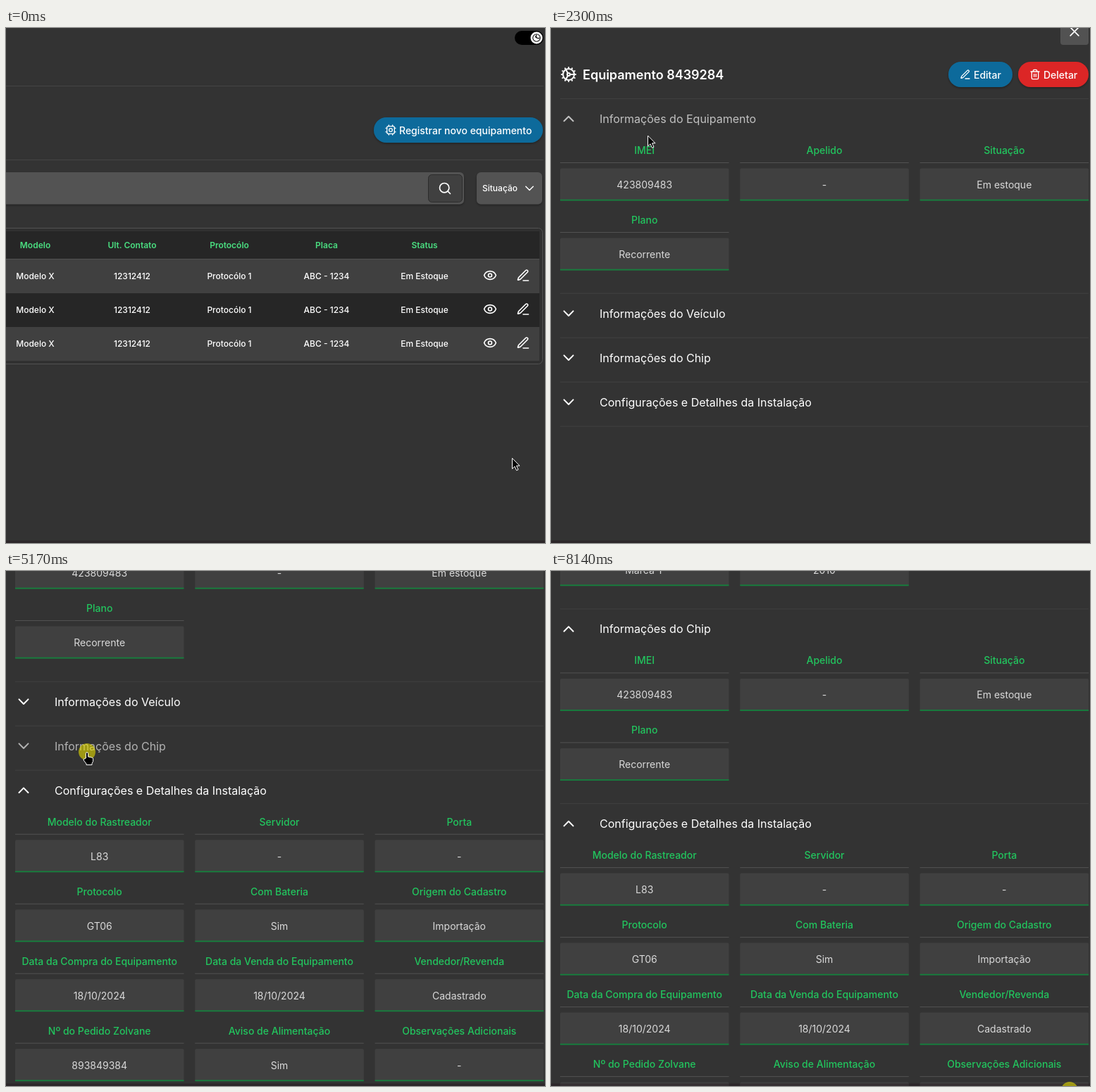
These frames come from a looping animation (765 px wide and 732 px high, 8.22 s). An HTML page:

```html
<!DOCTYPE html>
<html lang="pt">
<head>
<meta charset="utf-8">
<title>Equipamentos</title>
<style>
  html, body { margin: 0; width: 100%; height: 100%; overflow: hidden; background: #333; }
  svg { display: block; width: 765px; height: 732px; font-family: Inter, "Liberation Sans", sans-serif; }
  .icon { fill: none; stroke: #fff; stroke-linecap: round; stroke-linejoin: round; }
</style>
</head>
<body>
<svg id="stage" viewBox="0 0 765 732"></svg>
<script>
const LOOP = 8220;
const GREEN = '#22c55e', BLUE = '#0f6b9b';

const ICONS = {
  eye: '<path d="M2.06 12.35a1 1 0 0 1 0-.7 10.75 10.75 0 0 1 19.88 0 1 1 0 0 1 0 .7 10.75 10.75 0 0 1-19.88 0"/><circle cx="12" cy="12" r="3"/>',
  pen: '<path d="M12 21h9M16.4 3.6a1 1 0 0 1 3 3L7.4 18.6a2 2 0 0 1-.9.5l-2.9.9a.5.5 0 0 1-.6-.6l.9-2.9a2 2 0 0 1 .5-.9z"/>',
  search: '<circle cx="11" cy="11" r="8"/><path d="m21 21-4.3-4.3"/>',
  trash: '<path d="M3 6h18M19 6v14a2 2 0 0 1-2 2H7a2 2 0 0 1-2-2V6M8 6V4a2 2 0 0 1 2-2h4a2 2 0 0 1 2 2v2M10 11v6M14 11v6"/>',
  chip: '<rect x="4" y="4" width="16" height="16" rx="3"/><circle cx="12" cy="12" r="3.5"/><path d="M8 1.5V4M16 1.5V4M8 20v2.5M16 20v2.5M1.5 8H4M1.5 16H4M20 8h2.5M20 16h2.5"/>',
  cog: '<circle cx="12" cy="12" r="8"/><circle cx="12" cy="12" r="2"/><path d="M12 2v2M12 22v-2M17 20.7l-1-1.8M11 10.3 7 3.3M20.7 17l-1.8-1M3.3 7l1.8 1M14 12h8M2 12h2M20.7 7l-1.8 1M3.3 17l1.8-1M17 3.3l-1 1.8M11 13.7l-4 7"/>',
  moon: '<circle cx="12" cy="12" r="9"/><path d="M12 5a5 5 0 0 0 7 7M12 12l-3-3"/>',
  close: '<path d="m5 5 14 14M19 5 5 19"/>',
  down: '<path d="m5 9 7 7 7-7"/>'
};

const rect = (x, y, w, h, fill, rx = 0, extra = '') =>
  `<rect x="${x}" y="${y}" width="${w}" height="${h}" rx="${rx}" fill="${fill}" ${extra}/>`;
const text = (x, y, str, size, weight, fill = '#fff', anchor = 'middle') =>
  `<text x="${x}" y="${y + size * 0.36}" font-size="${size}" font-weight="${weight}" fill="${fill}" text-anchor="${anchor}">${str}</text>`;
const icon = (name, x, y, size, width = 2, extra = '') =>
  `<g class="icon" stroke-width="${width}" transform="translate(${x - size / 2} ${y - size / 2}) scale(${size / 24})" ${extra}>${ICONS[name]}</g>`;
const line = (x, y, w, color = '#444') => rect(x, y, w, 1, color);
const pill = (x, y, w, fill) => rect(x, y, w, 36, fill, 18, 'filter="url(#shadow)"');

const basics = [['IMEI', '423809483'], ['Apelido', '-'], ['Situação', 'Em estoque'], ['Plano', 'Recorrente']];
const sections = [
  { title: 'Informações do Equipamento', open: 1990, rows: 2, fields: basics },
  { title: 'Informações do Veículo', open: 6755, rows: 2, fields: [
    ['Placa', 'ABC-1234'], ['Tipo do Veículo', 'Carro'], ['Modelo do Veículo', 'Modelo X'],
    ['Marca', 'Marca Y'], ['Ano do Veículo', '2010']] },
  { title: 'Informações do Chip', open: 5205, rows: 2, fields: basics },
  { title: 'Configurações e Detalhes da Instalação', open: 2885, rows: 4, fields: [
    ['Modelo do Rastreador', 'L83'], ['Servidor', '-'], ['Porta', '-'],
    ['Protocolo', 'GT06'], ['Com Bateria', 'Sim'], ['Origem do Cadastro', 'Importação'],
    ['Data da Compra do Equipamento', '18/10/2024'], ['Data da Venda do Equipamento', '18/10/2024'], ['Vendedor/Revenda', 'Cadastrado'],
    ['Nº do Pedido Zolvane', '893849384'], ['Aviso de Alimentação', 'Sim'], ['Observações Adicionais', '-']] }
];

function pageMarkup() {
  const columns = [41.5, 179, 317, 455, 594];
  const heads = ['Modelo', 'Ult. Contato', 'Protocólo', 'Placa', 'Status'];
  const cells = ['Modelo X', '12312412', 'Protocólo 1', 'ABC - 1234', 'Em Estoque'];
  const row = i => {
    const y = 353 + i * 48;
    return rect(-5, y - 24, 762, 48, i % 2 ? '#262626' : '#404040')
      + cells.map((c, k) => text(columns[k], y, c, 12, 500)).join('')
      + icon('eye', 687, y - 1.5, 20) + icon('pen', 734, y - 1.5, 20);
  };
  return rect(0, 0, 765, 732, '#333')
    + rect(722, 4, 41, 20, '#000', 10)
    + '<circle cx="753" cy="14" r="8.5" fill="#fff"/>' + icon('moon', 753, 14, 14, 2, 'style="stroke:#111"')
    + line(0, 82, 763) + line(0, 187, 763)
    + pill(522, 127, 240, BLUE) + icon('chip', 546, 145, 16)
    + text(558, 145.5, 'Registrar novo equipamento', 14, 500, '#fff', 'start')
    + rect(-10, 205, 660, 45.5, '#525252', 6, 'filter="url(#shadow)"')
    + rect(599.5, 208.5, 48, 39, '#404040', 5, 'stroke="#2c2c2c"') + icon('search', 623, 228, 20)
    + rect(668, 205, 93, 45.5, '#525252', 6, 'filter="url(#shadow)"')
    + text(676, 228, 'Situação', 12, 500, '#fff', 'start') + icon('down', 743, 227.5, 18)
    + rect(-10, 284.5, 771.5, 193, '#303030', 6, 'stroke="#525252"')
    + rect(-5, 289, 762, 40, '#262626')
    + heads.map((h, k) => text(columns[k], 309, h, 12, 600, '#4ade80')).join('')
    + [0, 1, 2].map(row).join('') + line(0, 328, 757, '#525252');
}

function fieldMarkup([label, value], i) {
  const x = 13 + (i % 3) * 255.3, y = Math.floor(i / 3) * 99, mid = x + 119.7;
  return text(mid, y + 74, label, 14, 500, GREEN) + line(x, y + 91, 239.5, '#525252')
    + rect(x, y + 99.5, 239.5, 46, '#404040', 2) + rect(x, y + 143.7, 239.5, 1.8, '#15803d')
    + text(mid, y + 122.8, value, 14, 400, '#d9d9d9');
}

const sectionMarkup = s => `<g class="section">${line(13, 0, 750, '#404040')}
  <g class="head">${text(69, 29.2, s.title, 16, 400, '#fff', 'start')}
  <path class="icon chevron" stroke-width="2" d="M-6.5-3.3 0 3.3 6.5-3.3"/></g>
  <g class="body">${s.fields.map(fieldMarkup).join('')}</g></g>`;

const drawerMarkup = () => rect(-3, 0, 790, 732, '#333') + '<g id="content">'
  + rect(723, -16, 40, 40, '#525252', 4) + icon('close', 743, 5, 20)
  + icon('cog', 25, 66, 24) + text(45, 66.5, 'Equipamento 8439284', 18, 600, '#fff', 'start')
  + pill(564, 48, 91, BLUE) + icon('pen', 588, 66, 16) + text(600, 66.5, 'Editar', 14, 500, '#fff', 'start')
  + pill(663, 48, 100, '#dc2626') + icon('trash', 687, 66, 16) + text(699, 66.5, 'Deletar', 14, 500, '#fff', 'start')
  + sections.map(sectionMarkup).join('') + '<g id="end">' + line(13, 0, 750, '#404040') + '</g></g>';

const stage = document.getElementById('stage');
stage.innerHTML = `<defs><filter id="shadow" x="-10%" y="-20%" width="120%" height="150%">
    <feDropShadow dx="0" dy="1.5" stdDeviation="1.5" flood-opacity=".35"/></filter></defs>
  ${pageMarkup()}<rect id="overlay" width="765" height="732"/>
  <g id="drawer">${drawerMarkup()}</g>
  ${rect(0, 728.5, 765, 4, '#1a000c', 0, 'opacity=".25"')}
  <g id="cursor"><circle id="ring" r="12" fill="#e6dc00" opacity=".6"/>
    <g fill="#000" stroke="#fff" stroke-linejoin="round">
      <path id="arrow" d="M.5.5V15.5L4 12.2 6.6 17.8 9 16.7 6.5 11.2H11Z"/>
      <path id="hand" d="M-1.6 9V2.4a1.6 1.6 0 0 1 3.2 0V7l5.6 1.2q1.5.4 1.4 2V13.5L7 16.5V18.5H-1V17L-4.8 12q-.5-2 1-2Z"/>
    </g></g>`;

const $ = id => document.getElementById(id);
const parts = [...document.querySelectorAll('.section')].map(g => ({
  group: g, head: g.querySelector('.head'), chevron: g.querySelector('.chevron'), body: g.querySelector('.body')
}));

const clamp = x => Math.min(1, Math.max(0, x));
const easeOut = x => 1 - (1 - clamp(x)) ** 1.6;
const smooth = x => x * x * (3 - 2 * x);

// Interpolates between keys of the form [time, ...values].
function track(keys, t) {
  const i = keys.findIndex(k => k[0] > t);
  if (i < 0) return keys[keys.length - 1].slice(1);
  if (i === 0) return keys[0].slice(1);
  const a = keys[i - 1], b = keys[i], k = smooth((t - a[0]) / (b[0] - a[0]));
  return a.slice(1).map((v, n) => v + (b[n + 1] - v) * k);
}

const pointerKeys = [
  [40, 718, 611], [780, 685, 354], [1200, 685, 354], [1750, 138, 133], [2220, 138, 133],
  [2290, 137, 152], [2820, 115, 542], [3800, 115, 542], [4630, 115, 263], [4730, 115, 263],
  [4800, 115, 257], [5300, 115, 257], [5560, 115, 297], [6190, 115, 297], [6600, 104, 400],
  [6950, 104, 400], [7600, 662, 654], [7880, 690, 736], [8100, 736, 738]
];
const scrollKeys = [[3420, 0], [3720, 220], [5590, 220], [5640, 120], [5850, 120], [5965, 0], [6830, 0], [7200, 600]];
const clicks = [[790, 900], [1800, 1960], [2790, 2900], [5100, 5235], [6620, 6740], [8130, LOOP]];

function layout(t) {
  let y = 100;
  const tops = sections.map(s => {
    const top = y;
    y += t >= s.open ? s.rows * 99 + 78.7 : 63;
    return top;
  });
  return { tops, end: y };
}

function hovered(t) {
  if (t < 1250) return -1;
  const y = track(pointerKeys, t)[1] + track(scrollKeys, t)[0];
  const x = track(pointerKeys, t)[0];
  return x > 763 ? -1 : layout(t).tops.findIndex(top => y > top + 15 && y < top + 42.5);
}

function render(t) {
  const slide = easeOut((t - 860) / 350);
  $('overlay').setAttribute('opacity', 0.8 * clamp((t - 860) / 77));
  $('drawer').setAttribute('opacity', slide);
  $('drawer').setAttribute('transform', `translate(${850 * (1 - slide)})`);
  $('content').setAttribute('transform', `translate(0 ${-track(scrollKeys, t)[0]})`);

  const recent = Array.from({ length: 15 }, (_, k) => hovered(t - k * 20));
  const { tops, end } = layout(t);
  $('end').setAttribute('transform', `translate(0 ${end})`);
  parts.forEach((p, i) => {
    const dim = recent.filter(h => h === i).length / recent.length;
    p.group.setAttribute('transform', `translate(0 ${tops[i]})`);
    p.head.setAttribute('opacity', 1 - 0.38 * dim);
    p.chevron.setAttribute('transform', `translate(25 29) rotate(${180 * easeOut((t - sections[i].open) / 200)})`);
    p.body.style.display = t >= sections[i].open ? '' : 'none';
  });

  const [x, y] = track(pointerKeys, t), pointing = recent[0] >= 0;
  $('cursor').setAttribute('transform', `translate(${x} ${y})`);
  $('arrow').style.display = pointing ? 'none' : '';
  $('hand').style.display = pointing ? '' : 'none';
  $('ring').style.display = clicks.some(([a, b]) => t >= a && t < b) ? '' : 'none';
}

const start = performance.now();
function tick() {
  render((performance.now() - start) % LOOP);
  requestAnimationFrame(tick);
}
tick();
</script>
</body>
</html>
```
